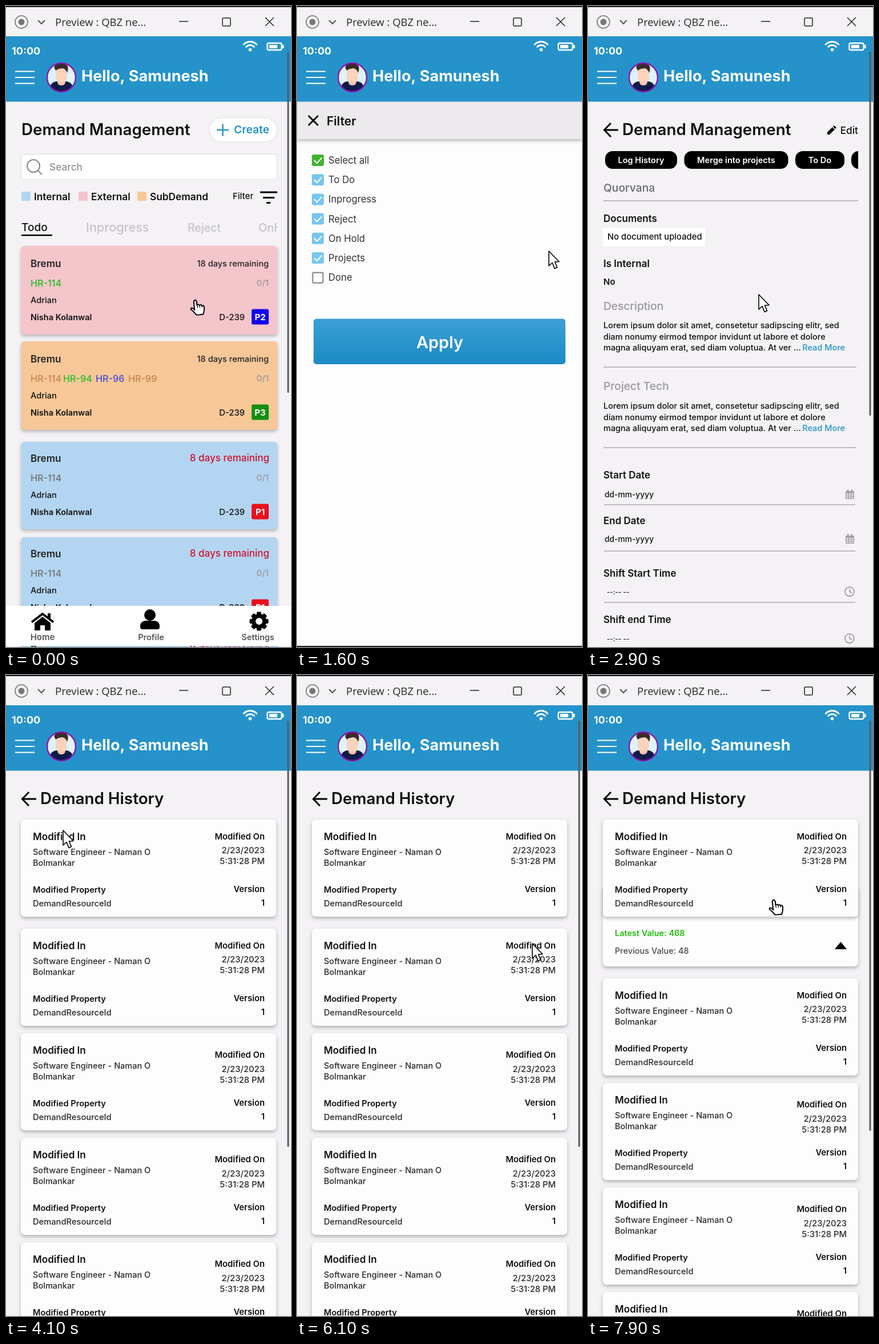
An HTML page with a canvas for the animation above (8 s loop, 499 by 1122 pixels).

```html
<!DOCTYPE html>
<html lang="en">
<head>
<meta charset="utf-8">
<title>Demand app preview</title>
<style>
  html, body { margin: 0; width: 100%; height: 100%; overflow: hidden; background: #f4f2f5; }
  canvas { display: block; width: 499px; height: 1122px; }
</style>
</head>
<body>
<canvas id="stage"></canvas>
<script>
const W = 499, H = 1122, LOOP = 8000;
const canvas = document.getElementById('stage');
const dpr = window.devicePixelRatio || 1;
canvas.width = W * dpr;
canvas.height = H * dpr;
const c = canvas.getContext('2d');

const BLUE = '#2593ca', INK = '#111', GRAY = '#9a989c', PAGE = '#f4f2f5', RULE = '#bdbbbf';
const GREEN = '#22bf22', TAN = '#c98350';
const LEAD = 'Samunesh', OWNER = 'Adrian', MANAGER = 'Nisha Kolanwal', CLIENT = 'Bremu';
const PROJECT = 'Quorvana', EDITOR = ['Naman O', 'Bolmankar'], FILE = 'QBZ';

// --- helpers ---
function text(s, x, y, size, weight = 500, color = INK, align = 'left', family = 'Inter') {
  c.font = `${weight} ${size}px "${family}", sans-serif`;
  c.fillStyle = color;
  c.textAlign = align;
  c.fillText(s, x, y);
}
function rect(x, y, w, h, color) {
  c.fillStyle = color;
  c.fillRect(x, y, w, h);
}
function box(x, y, w, h, r, fill, stroke, lw = 1) {
  c.beginPath();
  c.roundRect(x, y, w, h, r);
  if (fill) { c.fillStyle = fill; c.fill(); }
  if (stroke) { c.strokeStyle = stroke; c.lineWidth = lw; c.stroke(); }
}
function shadowBox(x, y, w, h, r, fill) {
  c.save();
  c.shadowColor = 'rgba(0,0,0,.27)';
  c.shadowBlur = 6 * dpr;
  c.shadowOffsetY = 3 * dpr;
  box(x, y, w, h, r, fill);
  c.restore();
}
function trace(points, close) {
  c.beginPath();
  points.forEach(([x, y], i) => i ? c.lineTo(x, y) : c.moveTo(x, y));
  if (close) c.closePath();
}
function line(points, color, lw) {
  trace(points);
  c.strokeStyle = color;
  c.lineWidth = lw;
  c.stroke();
}
function shape(points, color) {
  trace(points, true);
  c.fillStyle = color;
  c.fill();
}
function disc(x, y, r, fill, stroke, lw = 1) {
  c.beginPath();
  c.arc(x, y, r, 0, 7);
  if (fill) { c.fillStyle = fill; c.fill(); }
  if (stroke) { c.strokeStyle = stroke; c.lineWidth = lw; c.stroke(); }
}
function clipped(x, y, w, h, draw) {
  c.save();
  c.beginPath();
  c.rect(x, y, w, h);
  c.clip();
  draw();
  c.restore();
}
const rule = (y, x1, x2) => rect(x1, y - 1, x2 - x1, 2, RULE);
const scrollbar = end => box(492.5, 80, 3, end - 80, 1.5, '#5c5a5f');

// --- window and app header ---
function windowBar() {
  rect(0, 0, W, 2, '#1c1820');
  rect(0, 2, W, 51, '#f4f2f5');
  disc(27, 28, 11, null, '#777', 1.6);
  disc(27, 28, 5.5, '#777');
  line([[56, 25], [62, 31], [68, 25]], '#555', 2);
  text(`Preview : ${FILE} ne...`, 86, 35, 18.5, 400, '#2a2a2a', 'left', 'Open Sans');
  line([[303, 27], [319, 27]], '#222', 1.5);
  box(379, 21, 14, 14, 2, null, '#222', 1.5);
  line([[454, 20], [469, 35]], '#222', 1.5);
  line([[469, 20], [454, 35]], '#222', 1.5);
}
function avatar() {
  c.save();
  c.beginPath();
  c.arc(97, 125, 25, 0, 7);
  c.clip();
  rect(70, 98, 54, 54, '#def3fb');
  box(77, 132, 40, 30, 12, '#0d1b4a');
  box(90, 124, 14, 15, 6, '#f5c3a7');
  box(87, 105, 20, 29, 9, '#fbd3bd');
  c.beginPath();
  c.ellipse(96.5, 108, 12, 8, 0, Math.PI, 0);
  c.quadraticCurveTo(109, 113, 107, 117);
  c.quadraticCurveTo(104, 109, 98, 109);
  c.quadraticCurveTo(90, 110, 87, 113);
  c.closePath();
  c.fillStyle = '#3a2a2b';
  c.fill();
  c.restore();
  disc(97, 125, 25, null, '#8a14ad', 2.4);
}
function header() {
  rect(0, 53, W, 114.5, BLUE);
  text('10:00', 10, 84.5, 18, 700, '#fff');
  c.lineCap = 'round';
  for (const r of [15.5, 9.5]) {
    c.beginPath();
    c.arc(427.5, 78, r, -Math.PI * .76, -Math.PI * .24);
    c.strokeStyle = '#fff';
    c.lineWidth = 2.8;
    c.stroke();
  }
  disc(427.5, 76.5, 2.8, '#fff');
  c.lineCap = 'butt';
  box(457.5, 65, 25, 12, 2.5, null, '#fff', 2.4);
  rect(461, 68, 14, 6, '#fff');
  rect(483, 68, 3.5, 6, '#fff');
  for (const y of [114.5, 125, 135.5]) line([[16, y], [50, y]], '#fff', 2.2);
  avatar();
  text(`Hello, ${LEAD}`, 132, 132, 27, 700, '#fff');
}

// --- demand list ---
function demandCard(top, base, h, fill, tags, late, badge, badgeColor) {
  shadowBox(26.5, top, 448.5, h, 6, fill);
  text(CLIENT, 43, base, 17, 600, '#222');
  if (late) text('8 days remaining', 461, base - 1, 17, 500, '#d0122f', 'right');
  else text('18 days remaining', 460, base - 1, 14.6, 500, '#222', 'right');
  tags.forEach(([s, color], i) => text(s, [43, 100, 157, 214][i], base + 34, 16.2, 500, color));
  text('0/1', 460, base + 33, 15, 500, GRAY, 'right');
  text(OWNER, 43, base + 63, 14.6, 500);
  text(MANAGER, 43, base + 93, 14.5, 600);
  text('D-239', 418, base + 93, 14.8, 500, INK, 'right');
  box(430, base + 73.5, 30, 27, 3, badgeColor);
  text(badge, 445, base + 93, 15, 700, '#fff', 'center');
}
function gear(x, y) {
  c.save();
  c.translate(x, y);
  for (let i = 0; i < 8; i++) {
    box(-4, -16.5, 8, 10, 2, '#000');
    c.rotate(Math.PI / 4);
  }
  c.restore();
  disc(x, y, 9.5, null, '#000', 7);
}
function navBar() {
  rect(0, 1050, W, 70, '#fff');
  line([[45, 1078.5], [64, 1064], [83, 1078.5]], '#000', 4);
  rect(73, 1063, 5, 9, '#000');
  shape([[64, 1069], [78, 1080], [78, 1093], [68, 1093], [68, 1084], [60, 1084], [60, 1093], [50, 1093], [50, 1080]], '#000');
  disc(252, 1066, 10, '#000');
  box(235, 1076, 34, 15, [9, 9, 4, 4], '#000');
  gear(443, 1077);
  text('Home', 64, 1110, 15, 600, '#555', 'center');
  text('Profile', 254, 1110, 14.5, 600, '#555', 'center');
  text('Settings', 441, 1110, 14.4, 600, '#555', 'center');
}
function listScreen() {
  rect(0, 167, W, H - 167, PAGE);
  header();
  text('Demand Management', 27, 226, 27.8, 600);
  box(356, 196, 118.5, 42, 21, '#fff', '#dedce0');
  line([[369, 217], [390, 217]], BLUE, 2.5);
  line([[379.5, 206.5], [379.5, 227.5]], BLUE, 2.5);
  text('Create', 399, 223, 19.3, 600, BLUE);
  box(27, 259.5, 447.5, 44, 5, '#fff', '#dddbe0');
  disc(48, 280, 11, null, '#888', 2);
  line([[56, 288], [63, 295]], '#888', 2);
  text('Search', 76, 288, 17.3, 500, '#929094');

  const blue = '#b3d5f1', pink = '#f4c5cb', orange = '#f7c798';
  [[27, blue, 'Internal'], [127, pink, 'External'], [230, orange, 'SubDemand']].forEach(([x, color, s]) => {
    rect(x, 325, 16, 16, color);
    text(s, x + 22, 340, 17.3, 600);
  });
  text('Filter', 397, 338, 15, 500);
  line([[445, 326], [475, 326]], '#000', 3);
  line([[450, 335.5], [470, 335.5]], '#000', 3);
  line([[456, 344.5], [463, 344.5]], '#000', 3);

  text('Todo', 27, 394, 19, 500);
  rect(27, 400, 54, 2.5, '#000');
  clipped(26, 370, 449, 40, () => {
    text('Inprogress', 140, 395, 21.6, 500, '#c6c4c8');
    text('Reject', 318, 395, 19.5, 500, '#c6c4c8');
    text('OnHold', 442, 395, 20, 500, '#c6c4c8');
  });

  demandCard(420, 457, 155, pink, [['HR-114', GREEN]], false, 'P2', '#1406f0');
  demandCard(587, 624, 155, orange,
    [['HR-114', TAN], ['HR-94', GREEN], ['HR-96', '#4a4cdc'], ['HR-99', TAN]], false, 'P3', '#138f10');
  for (const top of [763, 930, 1097])
    demandCard(top, top + 35, 153, blue, [['HR-114', '#727074']], true, 'P1', '#ea0f1c');
  navBar();
  scrollbar(677);
}

// --- filter ---
function filterScreen() {
  rect(0, 167, W, H - 167, '#fefdfe');
  shadowBox(0, 167, W, 66, 0, '#eceaed');
  header();
  line([[20, 192], [37, 209]], '#000', 2.8);
  line([[37, 192], [20, 209]], '#000', 2.8);
  text('Filter', 52, 209, 21, 600);
  ['Select all', 'To Do', 'Inprogress', 'Reject', 'On Hold', 'Projects', 'Done'].forEach((s, i) => {
    const y = 270 + i * 34.2;
    if (s === 'Done') box(27.5, y - 8.5, 18, 18, 2, '#fff', '#8c8a8e', 2.2);
    else {
      box(26, y - 10, 21, 20, 3, i ? '#78c6ee' : '#3fb32f');
      line([[30, y], [35, y + 5], [43.5, y - 4.5]], '#fff', 2);
    }
    text(s, 55, y + 6, 16.7, 400, '#333');
  });
  const g = c.createLinearGradient(0, 547, 0, 627);
  g.addColorStop(0, '#3b9fd5');
  g.addColorStop(1, '#1c8bc5');
  box(29, 547.5, 441, 79.5, 5, g);
  text('Apply', 250, 599, 29, 600, '#fff', 'center');
  rect(0, 1120, W, 2, '#1c1820');
}

// --- demand detail ---
function backTitle(s) {
  line([[53, 217], [29, 217]], '#000', 3);
  line([[40, 205], [28.5, 217], [40, 229]], '#000', 3);
  text(s, 60, 226, 27.8, 600);
}
function lorem(y) {
  ['Lorem ipsum dolor sit amet, consetetur sadipscing elitr, sed',
   'diam nonumy eirmod tempor invidunt ut labore et dolore',
   'magna aliquyam erat, sed diam voluptua. At ver ...'].forEach((s, i) => text(s, 27, y + i * 19.5, 14.5, 500));
  text('Read More', 450, y + 39, 14.5, 500, BLUE, 'right');
}
function calendar(y) {
  rect(451, y - 6, 15, 14, '#a3a1a5');
  rect(454, y - 9, 2.5, 4, '#a3a1a5');
  rect(460.5, y - 9, 2.5, 4, '#a3a1a5');
  for (let i = 0; i < 9; i++) rect(452.5 + i % 3 * 4.5, y - 2 + Math.floor(i / 3) * 3.3, 3, 2, PAGE);
}
function clock(y) {
  disc(458, y, 8, null, '#8c8a8e', 1.4);
  line([[458, y - 5], [458, y], [462, y + 2]], '#8c8a8e', 1.4);
}
function detailScreen() {
  rect(0, 167, W, H - 167, PAGE);
  header();
  backTitle('Demand Management');
  shape([[419, 225], [419, 221], [428, 212], [432, 216], [423, 225]], '#000');
  shape([[429, 211], [431, 209], [435, 213], [433, 215]], '#000');
  text('Edit', 473, 224, 17.3, 500, INK, 'right');
  clipped(26, 250, 447, 40, () => {
    [[30, 126, 'Log History'], [168.5, 182, 'Merge into projects'], [363, 86, 'To Do'], [461, 90, '']].forEach(([x, w, s]) => {
      box(x, 254, w, 31, 13, '#000');
      text(s, x + w / 2, 274.5, 14.6, 600, '#fff', 'center');
    });
  });
  text(PROJECT, 27, 325, 19.3, 500, '#6c6a6e');
  rule(341, 27, 473);
  text('Documents', 27, 378, 17, 600);
  rect(26, 388, 179, 32, '#fff');
  text('No document uploaded', 34, 409, 14.8, 500);
  text('Is Internal', 27, 457, 17, 600);
  text('No', 27, 488, 15, 600);
  text('Description', 27, 532, 19.2, 500, GRAY);
  lorem(564);
  rule(632, 27, 470);
  text('Project Tech', 27, 672, 19.2, 500, GRAY);
  lorem(705);
  rule(773, 27, 470);
  [['Start Date', 827, 860, 873], ['End Date', 907, 938, 954]].forEach(([s, y, value, end]) => {
    text(s, 27, y, 17, 600);
    text('dd-mm-yyyy', 29, value, 13.8, 500);
    calendar(value - 5);
    rule(end, 28, 468);
  });
  [['Shift Start Time', 999, 1030, 1044], ['Shift end Time', 1080, 1112, 1126]].forEach(([s, y, value, end]) => {
    text(s, 27, y, 17, 600);
    text('--:-- --', 33, value, 11.8, 500);
    clock(value - 5);
    rule(end, 28, 468);
  });
  scrollbar(717);
}

// --- history ---
function historyCard(y, drop) {
  shadowBox(26, y, 447, 170, 7, '#fefdfe');
  text('Modified In', 47, y + 36, 17.1, 600);
  text(`Software Engineer - ${EDITOR[0]}`, 47, y + 62, 14.5, 500, '#2a2a2a');
  text(EDITOR[1], 47, y + 81, 14.5, 500, '#2a2a2a');
  text('Modified Property', 47, y + 128, 14.6, 600);
  text('DemandResourceId', 47, y + 152, 14.7, 500, '#2a2a2a');
  text('Modified On', 453, y + 35 + drop, 14.8, 600, INK, 'right');
  text('2/23/2023', 453, y + 59 + drop * 1.2, 14.8, 500, '#2a2a2a', 'right');
  text('5:31:28 PM', 453, y + 78 + drop * 1.2, 14.8, 500, '#2a2a2a', 'right');
  text('Version', 453, y + 127, 14.8, 600, INK, 'right');
  text('1', 453, y + 151, 14.8, 600, INK, 'right');
}
function historyScreen(open) {
  rect(0, 167, W, H - 167, PAGE);
  header();
  backTitle('Demand History');
  if (open) {
    shadowBox(26, 370, 447, 140, 7, '#fefdfe');
    text('Latest Value: 468', 47, 457, 14.5, 600, '#22bb0e');
    text('Previous Value: 48', 47, 488, 14.5, 500, '#4a484c');
    shape([[432, 480], [442.5, 467], [453, 480]], '#000');
  }
  historyCard(253, 0);
  for (let i = 0; i < 4; i++) historyCard(444 + i * 183 + (open ? 87 : 0), i ? 7.5 : 0);
  scrollbar(open ? 798 : 826);
}

// --- pointer: time, x, y, hand ---
const path = [
  [0, 331, 515, 1], [150, 331, 515, 1], [400, 380, 412, 0], [850, 460, 335, 1],
  [1200, 460, 336, 0], [1600, 441, 429, 0], [1900, 262, 590, 1], [2200, 247, 601, 0],
  [2350, 247, 601, 1], [2650, 299, 505, 1], [2800, 299, 505, 0], [3000, 299, 505, 0],
  [3700, 100, 272, 1], [4100, 100, 272, 0], [4500, 200, 330, 1], [4800, 275, 367, 1],
  [5250, 275, 367, 0], [5650, 440, 474, 1], [5900, 438, 473, 0], [6050, 412, 470, 0],
  [6400, 412, 470, 0], [6750, 380, 421, 1], [7200, 325, 394, 1], [8000, 325, 394, 1]
];
function arrow() {
  trace([[0, 0], [0, 26], [6, 20.5], [10, 30.5], [14.5, 28.5], [10.5, 19], [18, 18.5]], true);
}
function hand() {
  c.beginPath();
  c.moveTo(-2.5, 17);
  c.lineTo(-2.5, 2);
  c.quadraticCurveTo(0, -2.5, 2.5, 2);
  c.lineTo(2.5, 9);
  c.quadraticCurveTo(5, 6.5, 7, 10);
  c.quadraticCurveTo(9.5, 7.5, 11, 11);
  c.quadraticCurveTo(14.5, 9.5, 14.5, 13);
  c.quadraticCurveTo(15, 20, 11.5, 26);
  c.lineTo(0, 26);
  c.quadraticCurveTo(-4, 20, -9, 15);
  c.quadraticCurveTo(-8, 11, -4.5, 14.5);
  c.closePath();
}
function pointer(t) {
  const i = path.findIndex((p, k) => k + 1 === path.length - 1 || t < path[k + 1][0]);
  const [t0, x0, y0, isHand] = path[i], [t1, x1, y1] = path[i + 1];
  const u = (t - t0) / (t1 - t0), e = u * u * (3 - 2 * u);
  c.save();
  c.translate(x0 + (x1 - x0) * e, y0 + (y1 - y0) * e);
  if (isHand) {
    c.rotate(-.1);
    hand();
  } else arrow();
  c.lineJoin = 'round';
  c.fillStyle = '#fff';
  c.fill();
  c.strokeStyle = '#000';
  c.lineWidth = isHand ? 2 : 1.6;
  c.stroke();
  if (isHand) for (const x of [3, 7, 11]) line([[x, 10], [x, 14]], '#000', 1.2);
  c.restore();
}

// --- timeline: start time, screen ---
const scenes = [
  [0, listScreen], [1200, filterScreen], [2200, listScreen], [2800, detailScreen],
  [4100, () => historyScreen(false)], [5200, () => historyScreen(true)],
  [5900, () => historyScreen(false)], [7500, () => historyScreen(true)]
];
const start = performance.now();
function frame() {
  const t = (performance.now() - start) % LOOP;
  c.setTransform(dpr, 0, 0, dpr, 0, 0);
  scenes.filter(s => s[0] <= t).pop()[1]();
  windowBar();
  pointer(t);
  requestAnimationFrame(frame);
}
frame();
</script>
</body>
</html>
```
